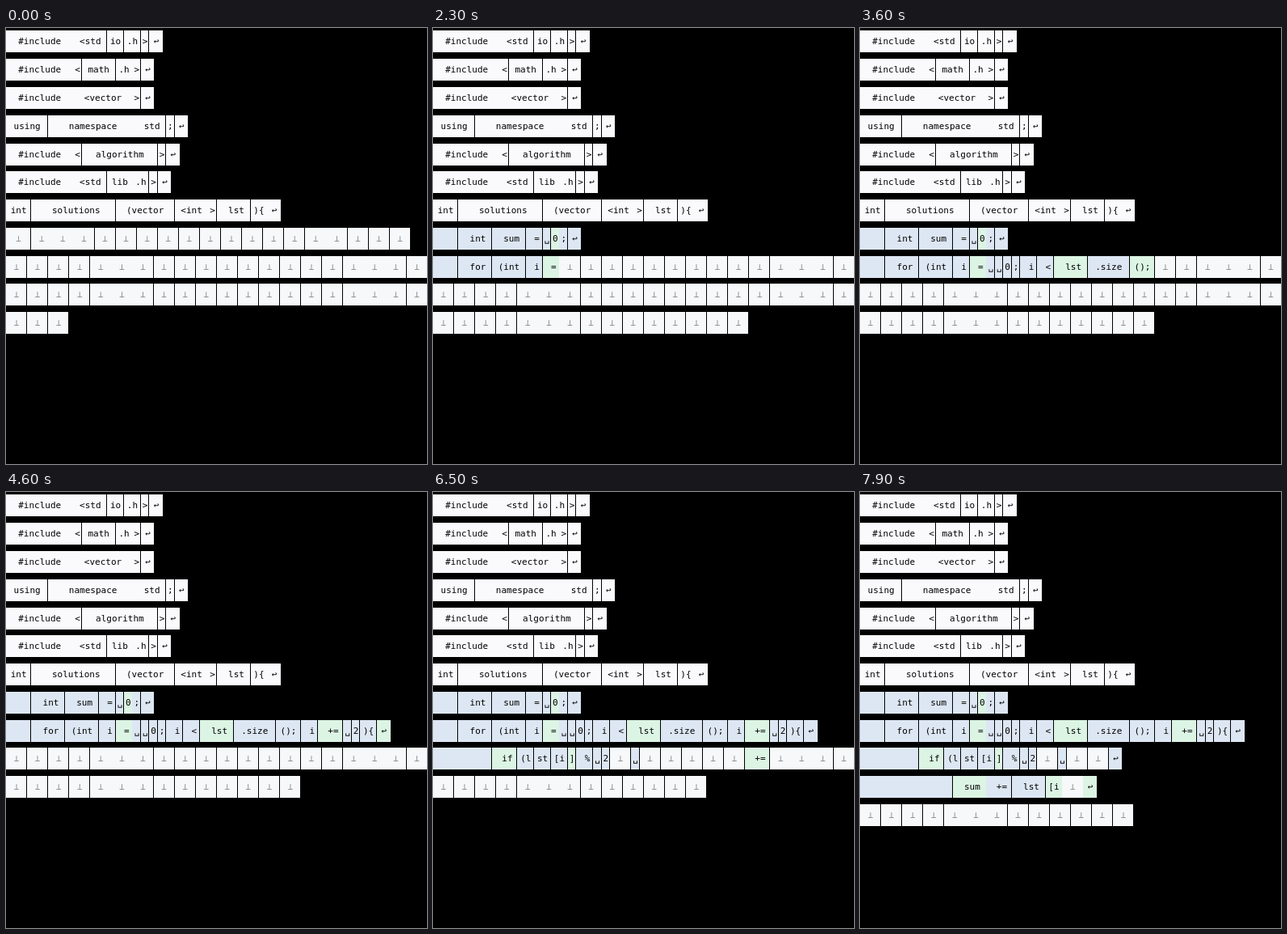
Recreate the animation shown at these times as an HTML page. Size 521x539 px, loop 8 s.

```html
<!DOCTYPE html>
<html lang="en">
<head>
<meta charset="utf-8">
<title>Token decoding</title>
<style>
  html, body { margin: 0; width: 100%; height: 100%; overflow: hidden; background: #000; }
  svg { display: block; width: 521px; height: 539px; }
  text { font: 11px "DejaVu Sans Mono", monospace; text-anchor: middle; }
</style>
</head>
<body>
<svg id="stage" viewBox="0 0 521 539" xmlns="http://www.w3.org/2000/svg"></svg>
<script>
const NS = "http://www.w3.org/2000/svg";
const LOOP = 8000, STEP = 100;
const SCALE = 0.86938, CHAR = 12, LINE = 40, TOP = 4, CELL = 31, MAX = 600;
const SPACE = 3.31; // half the advance of a leading blank
const MASK = "⊥", BREAK = "↩";
const FILL = { prompt: "#faf9fc", mask: "#f7f8fa", set: "#dde7f3", fresh: "#dcf4e4", draft: "#f6e9e6" };

const split = s => s.split("|");
const prompt = split(
  "#include|<std|io|.h|>|↩|#include|<|math|.h|>|↩|#include|<vector|>|↩|" +
  "using| namespace| std|;|↩|#include|<|algorithm|>|↩|#include|<std|lib|.h|>|↩|" +
  "int| solutions|(vector|<int|>| lst|){|↩");
const answer = split(
  "   | int| sum| =|␣|0|;|↩|" +
  "   | for|(int| i| =|␣|␣|0|;| i| <| lst|.size|();| i| +=|␣|2|){|↩|" +
  "       | if|(l|st|[i|]| %|␣|2|⊥|␣|⊥|⊥|↩|" +
  "           | sum| +=| lst|[i|⊥|↩");
const COUNT = 62;

// Each burst: start time, slots filled in order, then a rejected draft.
// The next burst opens by correcting that draft.
const bursts = [
  [300, [0, 1, 2, 3, 4, 6, 7], 5, ";"],
  [1400, [8, 9, 10, 11], 12, " <"],
  [2300, [13, 15, 16, 17, 18, 20], 19, " sum"],
  [3400, [14, 21, 22, 24, 25], 23, " ="],
  [4400, [26, 27, 28], 29, " sum"],
  [5200, [30, 31, 32], 33, "])"],
  [6000, [34, 35, 36, 38, 44, 41], 43, " lst"],
  [7100, [45], 46, "["],
  [7700, [42, 48]]
];

const steps = [];
let wrong;
for (const [start, slots, bad, text] of bursts) {
  let at = start;
  const add = (slot, text, kind) => {
    steps.push({ at, slot, text, kind });
    at += STEP;
  };
  if (wrong !== undefined) add(wrong, answer[wrong], "fresh");
  for (const slot of slots) add(slot, answer[slot], "set");
  if (bad !== undefined) add(bad, text, "draft");
  wrong = bad;
}

function tokensAt(done) {
  const list = Array.from({ length: COUNT }, () => ({ text: MASK, kind: "mask" }));
  list[0].width = 3 * CHAR;
  steps.slice(0, done).forEach(({ slot, text, kind }, i) => {
    const bold = i === done - 1;
    list[slot] = { text, bold, kind: bold && kind === "set" ? "fresh" : kind };
  });
  return prompt.map(text => ({ text, kind: "prompt" })).concat(list);
}

function widthOf({ text, width }) {
  if (width) return width;
  if (text === MASK) return 30;
  return text === BREAK ? 20 : CHAR * text.length;
}

const svg = document.getElementById("stage");
function node(name, attrs) {
  const el = document.createElementNS(NS, name);
  for (const key in attrs) el.setAttribute(key, attrs[key]);
  svg.appendChild(el);
  return el;
}

const px = v => Math.round(v * SCALE);

function drawCell(token, x, row, w) {
  const left = px(x), top = px(TOP + row * LINE);
  node("rect", {
    x: left, y: top,
    width: px(x + w - 1) - left,
    height: px(TOP + row * LINE + CELL) - top,
    fill: FILL[token.kind], "shape-rendering": "crispEdges"
  });
  const label = token.text.trim();
  if (!label) return;
  node("text", {
    x: (x + w / 2) * SCALE + (token.text[0] === " " ? SPACE : 0),
    y: top + 17,
    fill: token.kind === "mask" ? "#8c8c8c" : "#000",
    "font-weight": token.bold ? 700 : 400
  }).textContent = label;
}

function draw(done) {
  svg.replaceChildren();
  let x = 0, row = 0;
  for (const token of tokensAt(done)) {
    const w = widthOf(token);
    if (x + w > MAX) { x = 0; row++; }
    drawCell(token, x, row, w);
    x += w;
    if (token.text === BREAK) { x = 0; row++; }
  }
}

let shown = -1;
const origin = performance.now();
function tick(now) {
  const t = Math.max(0, now - origin) % LOOP;
  const done = steps.filter(s => s.at <= t).length;
  if (done !== shown) draw(shown = done);
  requestAnimationFrame(tick);
}
tick(origin);
</script>
</body>
</html>
```
